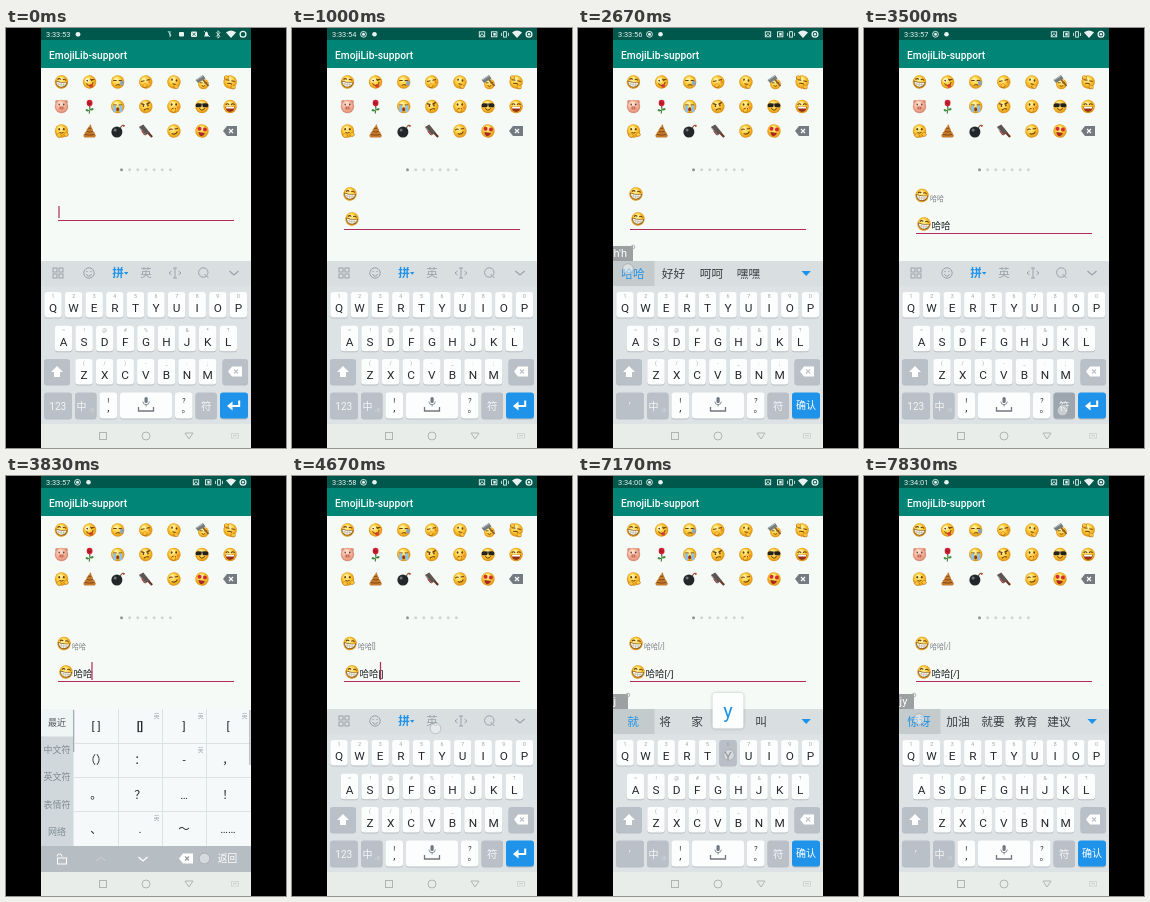
An HTML page with a canvas for the animation above (8000 ms loop, 280 by 420 pixels).

```html
<!DOCTYPE html>
<html lang="zh">
<head>
<meta charset="utf-8">
<title>Emoji keyboard demo</title>
<style>
html, body { margin: 0; width: 100%; height: 100%; overflow: hidden; background: #000; }
canvas { display: block; width: 280px; height: 420px; }
</style>
</head>
<body>
<canvas id="stage"></canvas>
<script>
const LOOP = 8000;
const canvas = document.getElementById('stage');
const ratio = window.devicePixelRatio || 1;
canvas.width = 280 * ratio;
canvas.height = 420 * ratio;
const c = canvas.getContext('2d');
const TAU = Math.PI * 2;
const BLUE = '#1f93ea', PINK = '#b02c5c', GREY = '#9aa3aa', INK = '#24272b', BROWN = '#6e3d0c';

// Committed text: time, text, caret offset from the end
const EDITS = [[0, null, 0], [500, '', 0], [2830, '哈哈', 0], [4660, '哈哈[]', 1], [6160, '哈哈[/]', 1]];
// Pinyin being composed: time, letters, candidates as [word, x]
const COMPOSING = [
  [0, ''],
  [2160, 'h', [['好', 55], ['还', 87], ['和', 119], ['会', 151], ['很', 183]]],
  [2490, "h'h", [['哈哈', 55], ['好好', 95.5], ['呵呵', 133.5], ['嘿嘿', 170.5]]],
  [2830, ''],
  [6830, 'j', [['就', 55], ['将', 87], ['家', 119], ['及', 151], ['叫', 183]]],
  [7330, 'jy', [['惊讶', 55], ['加油', 94], ['就要', 129], ['教育', 162], ['建议', 195]]]
];
// Pressed keys: start, end, key, popup label
const PRESSES = [
  [2000, 2160, 'H', 'h'], [2330, 2490, 'H', 'h'], [3500, 3660, '符'],
  [5660, 5990, 'X', 'x'], [5990, 6160, 'X', '/'], [6670, 6830, 'J', 'j'], [7170, 7330, 'Y', 'y']
];
// Finger marks: start, end, x, y
const TOUCHES = [
  [330, 500, 57, 54], [2000, 2160, 162, 313], [2330, 2490, 162, 313], [2660, 2830, 50, 241],
  [3500, 3990, 198.5, 382.5], [4500, 4830, 143.5, 252.5], [5660, 6490, 98.5, 347.5],
  [6670, 6830, 182, 313], [7170, 7330, 151, 279], [7660, 8000, 55, 243]
];
const PANEL = [3660, 4660];
const RECORDING = 160;

const current = (table, t) => table.filter(row => row[0] <= t).pop();

function text(s, x, y, size, color = INK, align = 'center', weight = 400) {
  c.font = `${weight} ${size}px Roboto, "Noto Sans CJK SC", "Noto Sans CJK", sans-serif`;
  c.textAlign = align;
  c.fillStyle = color;
  c.fillText(s, x, y);
}
function rect(x, y, w, h, color, r = 0) {
  c.fillStyle = color;
  c.beginPath();
  r ? c.roundRect(x, y, w, h, r) : c.rect(x, y, w, h);
  c.fill();
}
function frame(x, y, w, h, color, width = 1) {
  c.strokeStyle = color;
  c.lineWidth = width;
  c.strokeRect(x, y, w, h);
}
function disc(x, y, r, color, ry = r) {
  c.fillStyle = color;
  c.beginPath();
  c.ellipse(x, y, r, ry, 0, 0, TAU);
  c.fill();
}
function ring(x, y, r, color, width = 1, from = 0, to = TAU) {
  c.strokeStyle = color;
  c.lineWidth = width;
  c.beginPath();
  c.arc(x, y, r, from, to);
  c.stroke();
}
function line(points, color, width = 1) {
  c.strokeStyle = color;
  c.lineWidth = width;
  c.stroke(new Path2D(points));
}
const shape = (points, color) => { c.fillStyle = color; c.fill(new Path2D(points)); };

// Emoji are drawn around their own centre, about 14 px across
function ball(light = '#fff3a0', mid = '#fdc832', dark = '#d98a12') {
  const g = c.createRadialGradient(-1.5, -3, 1, 0, 0, 7);
  g.addColorStop(0, light);
  g.addColorStop(.55, mid);
  g.addColorStop(1, dark);
  disc(0, 0, 6.7, g);
}
function eyes(y = -1.5, r = .9, color = BROWN) {
  disc(-2.3, y, r, color, r * 1.3);
  disc(2.3, y, r, color, r * 1.3);
}
const smile = (y = 1, r = 3) => ring(0, y, r, BROWN, 1, .2, Math.PI - .2);
const brows = () => line('M-4.5-3.5L-1-2M4.5-3.5L1-2', BROWN, 1.3);
const shut = () => line('M-4.5-1.5H-1M1-1.5H4.5', BROWN, 1.1);
function hand(x, y) {
  disc(x, y, 2.5, '#b5680f', 2.1);
  disc(x, y - .2, 2, '#fcc43a', 1.6);
}

const EMOJI = {
  grin() {
    c.rotate(.12);
    ball();
    line('M-4.3-2Q-2.6-4-1-2.4M1-2.4Q2.6-4 4.3-2', BROWN, 1.1);
    shape('M-6-.8Q0 1 6-.8Q5.6 5.4 0 5.6Q-5.6 5.4-6-.8', '#80551d');
    shape('M-5.2 0Q0 1.5 5.2 0Q4.6 4.5 0 4.7Q-4.6 4.5-5.2 0', '#f7f7f0');
    line('M-5 2Q0 3.4 5 2M-2.4 .6V4.4M0 .8V4.6M2.4 .6V4.4', '#b3a98c', .5);
  },
  tongue() {
    c.rotate(-.2);
    ball();
    disc(-2.4, -2, 1.6, '#fff'); disc(-2.1, -1.8, .9, BROWN);
    line('M1-2.6L4.2-1.6L1.4-.9', BROWN, 1);
    smile(0, 3.4);
    rect(-1, 2.4, 3.6, 3.4, '#dc3b35', 1.5);
  },
  sweat() {
    ball();
    shut();
    line('M-2 3.4Q0 2 2.6 3.2', BROWN, 1);
    disc(4.2, .9, 1.7, '#7ba3d8', 2.5);
  },
  shy() { c.rotate(-.2); ball(); shut(); disc(3.8, 1, 1.3, '#ef8b30'); hand(-1.5, 3.4); },
  think() { c.rotate(.2); ball(); eyes(-2); line('M-1 2H2.5', BROWN); hand(3, 4.2); },
  hammer() {
    c.save();
    c.translate(1.4, 2);
    c.scale(.8, .8);
    ball(); shut(); smile(1, 2);
    c.restore();
    line('M0-3.5L6.5 4', '#8a5a2c', 1.6);
    shape('M-6.5-2L1-7L3.5-3.5L-4 1Z', '#747c80');
    line('M-5.5-2L1-6', '#b3babc', 1);
  },
  dizzy() { c.rotate(.2); ball(); shut(); line('M-2.5 2Q0 .8 2.5 2', BROWN); hand(4, 4.5); hand(-4.5, -3.5); },
  pig() {
    disc(-4.4, -4.6, 2, '#d98b73'); disc(4.4, -4.6, 2, '#d98b73');
    ball('#fde0cf', '#f5b79d', '#d5836b');
    eyes(-2, .7, '#532d25');
    disc(0, 1.5, 3, '#e28f78', 2.1);
    disc(-1, 1.5, .6, '#8e3d37'); disc(1, 1.5, .6, '#8e3d37');
  },
  rose() {
    line('M0-1Q1 3-.5 7', '#31742d', 1.1);
    shape('M0 3Q4 0 4 3Q2 5 0 3M0 4Q-4 1-4 4Q-2 6 0 4', '#3d8936');
    disc(0, -3.4, 2.9, '#cf1f30', 3.3);
    ring(0, -3.8, 1.3, '#8c1020', .8, 0, 4);
  },
  cry() {
    ball();
    shut();
    rect(-4.6, -1.2, 2.9, 7, '#8fc0ea', 1); rect(1.7, -1.2, 2.9, 7, '#8fc0ea', 1);
    disc(0, 2.8, 1.5, '#8a3b1c', 2);
  },
  angry() { c.rotate(-.15); ball(); brows(); eyes(-.8, .8); line('M-2.5 3.4Q0 1.6 2.8 3', BROWN, 1.1); },
  hush() { ball(); eyes(-2); disc(4, 1, 1.3, '#ef8b30'); line('M-2 2H2', BROWN); hand(-.5, 4); line('M.5-.5V4', '#fcc43a', 1.5); },
  cool() { ball(); rect(-6.3, -3, 5.9, 3.8, '#25211e', 1.6); rect(.4, -3, 5.9, 3.8, '#25211e', 1.6); line('M-5-2.4H5', '#25211e'); smile(1, 2.6); },
  laugh() {
    ball();
    line('M-4.4-1.6Q-2.6-4-1-1.6M1-1.6Q2.6-4 4.4-1.6', BROWN, 1.1);
    shape('M-4.8 .2H4.8Q3.8 5.4 0 5.4Q-3.8 5.4-4.8 .2', '#963019');
    rect(-4, .4, 8, 1.6, '#fff');
  },
  wave() { ball(); eyes(-1.8); line('M-2 1.5Q0 2.6 2 1.5', BROWN); hand(-2.5, 4.6); hand(4.6, 3.6); },
  poop() {
    shape('M.5-7Q2.5-5 1.6-3.5Q4-2 3.2 0Q5.5 1 5 3Q7.5 4.5 5 6.5H-5Q-7.5 4.5-5 3Q-5.5 1-3 0Q-3.6-2-1.4-3.2Q0-4.5 .5-7', '#c67a2c');
    line('M-1.5-3Q0-1.8 2-3.2M-3 .2Q0 2 3.4 .2M-5 3.4Q0 5 5 3.3', '#7b4513', .9);
  },
  bomb() {
    line('M2.5-2.5Q4-7 6.5-5', '#6d5a48', 1.1);
    disc(6, -5.2, 1.1, '#c9472a');
    disc(-.8, 1, 5.5, '#24272a'); disc(-2.6, -1, 1.5, '#70777c');
  },
  cleaver() {
    shape('M-7-4L-2.5-6.5L4 1.5L-.5 4.5Z', '#5d5552');
    line('M-6.4-3.6L-.4 4', '#a9a9a6', 1);
    line('M2.6 2L6.3 6', '#6b3421', 2.3);
    line('M-4 0L-1 4', '#b23530', 1.2);
  },
  smirk() { c.rotate(-.15); ball(); line('M-4.4-1.5Q-2.6-3.2-1-1.6M1-1.8H4.4', BROWN, 1.1); line('M-2.6 2.2Q1 4.6 3.4 1', BROWN, 1.1); },
  love() {
    c.rotate(.15);
    ball();
    disc(-2.7, -1.9, 2, '#d62a30'); disc(2.7, -1.9, 2, '#d62a30');
    shape('M-3.4 1.6H3.4Q2.4 5.2 0 5.2Q-2.4 5.2-3.4 1.6', '#a82824');
  }
};
function emoji(name, x, y) {
  c.save();
  c.translate(x, y);
  EMOJI[name]();
  c.restore();
}
function backspace(x, y, color, cross) {
  shape(`M${x - 7} ${y}l4-5h10v10h-10z`, color);
  line(`M${x - 1} ${y - 2}l4 4m0-4l-4 4`, cross, 1.1);
}

function statusBar(t) {
  const white = '#e8f3f0', teal = '#00574b';
  rect(35, 0, 210, 12, teal);
  const s = 53 + Math.floor((t + 800) / 1000);
  const clock = `3:${33 + Math.floor(s / 60)}:${String(s % 60).padStart(2, '0')}`;
  text(clock, 40, 9, 7.4, white, 'left');
  shape('M220 4.6q5-4 10 0l-5 5.4z', white);
  ring(237, 6.3, 2.9, white, 1.3);
  if (t < RECORDING) {
    disc(72, 6.3, 2.4, white);
    line('M162 3l3 5M164 3v6', white, .8);
    rect(173, 4, 5, 4.5, white, 1);
    rect(185, 3.5, 6, 5.5, white, 1);
    line('M186.5 4.8l3 3m0-3l-3 3', teal, .8);
    shape('M198 8.5q1-1 1-3q1.5-4 3 0q0 2 1 3z', white);
    line('M198 3l6 6', white, .7);
    line('M210 4.2l4 4l-2 2v-7.5l2 2l-4 4', white, .8);
  } else {
    ring(71.5, 6.3, 2.9, white, .9);
    disc(71.5, 6.3, 1.5, white);
    disc(82.5, 6.3, 2.3, white);
    frame(187.3, 3.8, 5.4, 5, white, .9);
    line('M188 8l2-2.5l2 2.5', white, .9);
    frame(199.5, 3.8, 5.4, 5, white, .9);
    rect(201.3, 5, 2.4, 2.6, white);
    frame(211.6, 3.7, 2.8, 5.4, white, .9);
    line('M209.5 4.8v3.2M216.5 4.8v3.2', white, .8);
    disc(237, 6.3, 1.2, white);
  }
}
function app(t) {
  rect(35, 12, 210, 28, '#008577');
  text('EmojiLib-support', 43, 30.8, 10.2, '#fff', 'left', 500);
  rect(35, 40, 210, 193, '#f5faf7');
  Object.keys(EMOJI).forEach((name, i) => emoji(name, 55.5 + i % 7 * 28.1, 54 + Math.floor(i / 7) * 24.5));
  backspace(224, 103, '#737b80', '#fff');
  for (let i = 0; i < 7; i++) disc(115.5 + i * 8.15, 141.7, 1.5, i ? '#d0d5d2' : '#8f9693');
  editor(t);
}
function editor(t) {
  const [since, value, back] = current(EDITS, t);
  const base = value === null ? 192 : value ? 205 : 201;
  let caret = 53;
  if (value !== null) {
    emoji('grin', 58, value ? 167.5 : 166);
    emoji('grin', 60, value ? 196 : 191);
    text(value, 66, 173.3, 7, '#7b7f80', 'left');
    text(value, 67.5, 201, 9.5, '#202326', 'left');
    caret = 67 + c.measureText(value.slice(0, value.length - back)).width;
  }
  rect(52, base, 176, 1, PINK);
  const blinkOn = Math.floor((t - since) / 500) % 2 === 0;
  if (blinkOn && !current(COMPOSING, t)[1]) {
    value ? rect(caret - .6, 186, 1.2, 18, PINK) : rect(caret - .6, base - 14, 1.2, 12, PINK);
  }
}

function toolbar() {
  for (const x of [47, 53]) for (const y of [240, 246]) frame(x, y, 4, 4, GREY);
  ring(83, 245, 5.2, GREY);
  ring(83, 245.5, 2.6, GREY, 1, .2, 2.94);
  disc(81, 243.5, .7, GREY); disc(85, 243.5, .7, GREY);
  text('拼', 112, 249.3, 11.5, BLUE, 'center', 700);
  shape('M118 244h4.4l-2.2 2.7z', BLUE);
  text('英', 140, 249.3, 11.5, GREY);
  line('M169 240v10m-2-10h4m-4 10h4M165.5 243l-2.5 2l2.5 2M172.5 243l2.5 2l-2.5 2', GREY);
  ring(197.3, 244.5, 4.7, GREY);
  line('M198.5 246l4 4', GREY);
  line('M223.5 243l4.5 4l4.5-4', GREY, 1.2);
}
function candidates(letters, words) {
  const width = letters.length > 2 ? 20 : 15;
  rect(35, 218, width, 15, '#9ca0a0');
  text(letters, 35.5, 229, 11, '#fff', 'left');
  ring(35 + width, 219, 1.8, '#a7abae', .9);
  rect(35, 233, 41.5, 25, '#c4cbcd');
  words.forEach(([word, x], i) => text(word, x, 250, 11.7, i ? '#3a4044' : BLUE));
  shape('M223.5 243h9.4l-4.7 5z', BLUE);
}
function key(x, y, w, h, color) {
  rect(x, y + 1, w, h, '#b6bdc2', 3);
  rect(x, y, w, h, color, 3);
}
const ROWS = [
  ['QWERTYUIOP', '1234567890', 47, 264],
  ['ASDFGHJKL', "~!@#%'&*?", 57.5, 297.7],
  ['ZXCVBNM', '(/)-_:;', 78, 331]
];
function keyboard(t) {
  const [, letters, words] = current(COMPOSING, t);
  const press = PRESSES.find(p => p[0] <= t && t < p[1]);
  const dark = '#b9c0c7', pale = '#fcfefe';
  rect(35, 233, 210, 163, '#dde2e4');
  rect(35, 233, 210, 25, '#d9dfe0');
  letters ? candidates(letters, words) : toolbar();

  let popup;
  for (const [chars, hints, left, y] of ROWS) {
    [...chars].forEach((ch, i) => {
      const x = left + i * 20.6;
      const down = press && press[2] === ch;
      key(x - 8.7, y, 17.4, 25.5, down ? '#b8bfc6' : pale);
      text(hints[i], x, y + 6.4, 5.2, '#9da3a8');
      text(ch, x, y + 20, 11.8);
      if (down) popup = [x, y, press[3]];
    });
  }
  key(38, 331, 26, 25.5, dark);
  shape('M51 338l6 6h-3v5h-6v-5h-3z', '#fff');
  key(216.5, 331, 25.5, 25.5, dark);
  backspace(229, 343.5, '#fff', dark);

  key(38, 364.5, 28, 26, dark);
  text(letters ? '’' : '123', 51.7, 381.5, 10, '#f4f6f7');
  key(69, 364.5, 21.5, 26, dark);
  text('中', 75.5, 381.5, 10, '#f4f6f7');
  text('/英', 85.5, 384, 4, '#d5dade');
  key(93.5, 364.5, 17.5, 26, pale);
  text('!', 102.3, 375, 8); text(',', 102.3, 383, 11);
  key(114, 364.5, 52, 26, pale);
  rect(138.5, 369, 3.2, 6, '#6f7880', 1.6);
  ring(140.1, 373.5, 3.2, '#6f7880', .8, 0, Math.PI);
  line('M140.1 376.5v2', '#6f7880', .8);
  line('M132.5 379v4h15v-4', '#6f7880', 1.3);
  key(169, 364.5, 17.5, 26, pale);
  text('?', 178, 374.5, 7); text('。', 180, 384, 9);
  key(189.5, 364.5, 21.5, 26, press && press[2] === '符' ? '#9da6ae' : dark);
  text('符', 200.3, 381.5, 10.5, '#f4f6f7');
  key(214, 364.5, 28, 26, BLUE);
  if (letters) text('确认', 228, 381.3, 10, '#fff');
  else {
    line('M233.2 372.5v5.5h-9', '#fff', 2);
    shape('M221 378l5.5-4.5v9z', '#fff');
  }

  if (popup) {
    const [x, y, label] = popup;
    c.save();
    c.shadowColor = '#0004';
    c.shadowBlur = 3 * ratio;
    rect(x - 15.5, y - 47, 31, 35.5, pale, 3);
    c.restore();
    text(label, x, y - 22.5, 20, BLUE);
  }
}

const SYMBOLS = ['[ ]', '[]', ']', '[', '（）', '：', '-', '，', '。', '？', '…', '！', '、', '.', '～', '……'];
const HALF_WIDTH = [1, 2, 3, 6, 13];
function symbolPanel() {
  rect(35, 233, 210, 137, '#f5f9fa');
  rect(35, 233, 32.5, 137, '#d0d8db');
  rect(35, 233, 32.5, 27.4, '#eff4f4');
  ['最近', '中文符', '英文符', '表情符', '网络'].forEach((tab, i) =>
    text(tab, 51, 250 + i * 27.2, 9, i ? '#7f8b92' : '#4c555b'));
  rect(67, 234, 1.3, 42, '#a6adb1');
  SYMBOLS.forEach((s, i) => {
    const x = 90 + i % 4 * 44, y = 250 + Math.floor(i / 4) * 34.3;
    text(s, x, y + 4, 11.5, INK, 'center', i === 1 ? 500 : 400);
    if (HALF_WIDTH.includes(i)) text('英', x + 16.5, y - 8.5, 5.7, '#9aa1a6');
  });
  for (let i = 1; i < 4; i++) {
    rect(68 + i * 44, 233, 1, 137, '#dce2e4');
    rect(68, 233 + i * 34, 177, 1, '#dce2e4');
  }
  rect(243.3, 234, 1.2, 55, '#a6adb1');
  rect(35, 370, 210, 26, '#b7bec3');
  frame(51.5, 382, 9, 6, '#fff');
  ring(53.5, 380.5, 2.5, '#fff', 1, Math.PI, TAU);
  line('M90.5 385l4.5-4l4.5 4', '#c5cbcf', 1.2);
  line('M132.5 381l4.5 4l4.5-4', '#fff', 1.3);
  backspace(180, 382.5, '#fff', '#8d969c');
  text('返回', 221.5, 386, 9.7, '#fff');
}

function navBar() {
  const tone = '#b0b5b2', faint = '#cbd0cd';
  rect(35, 396, 210, 24, '#e9edea');
  frame(93.5, 404.5, 7, 7, tone);
  ring(140, 408, 4, tone);
  line('M179 405h8l-4 6z', tone);
  frame(225.5, 405.5, 7, 4.5, faint, .8);
  line('M227 407.5h4', faint, 1);
}
function touches(t) {
  for (const [start, end, x, y] of TOUCHES) {
    if (t < start || t >= end) continue;
    disc(x, y, 5.3, '#f4f6f680');
    ring(x, y, 5.3, '#858d9580', .8);
  }
}

const begin = performance.now();
function draw() {
  const t = (performance.now() - begin) % LOOP;
  c.setTransform(ratio, 0, 0, ratio, 0, 0);
  rect(0, 0, 280, 420, '#000');
  statusBar(t);
  app(t);
  t >= PANEL[0] && t < PANEL[1] ? symbolPanel() : keyboard(t);
  navBar();
  touches(t);
  requestAnimationFrame(draw);
}
draw();
</script>
</body>
</html>
```
